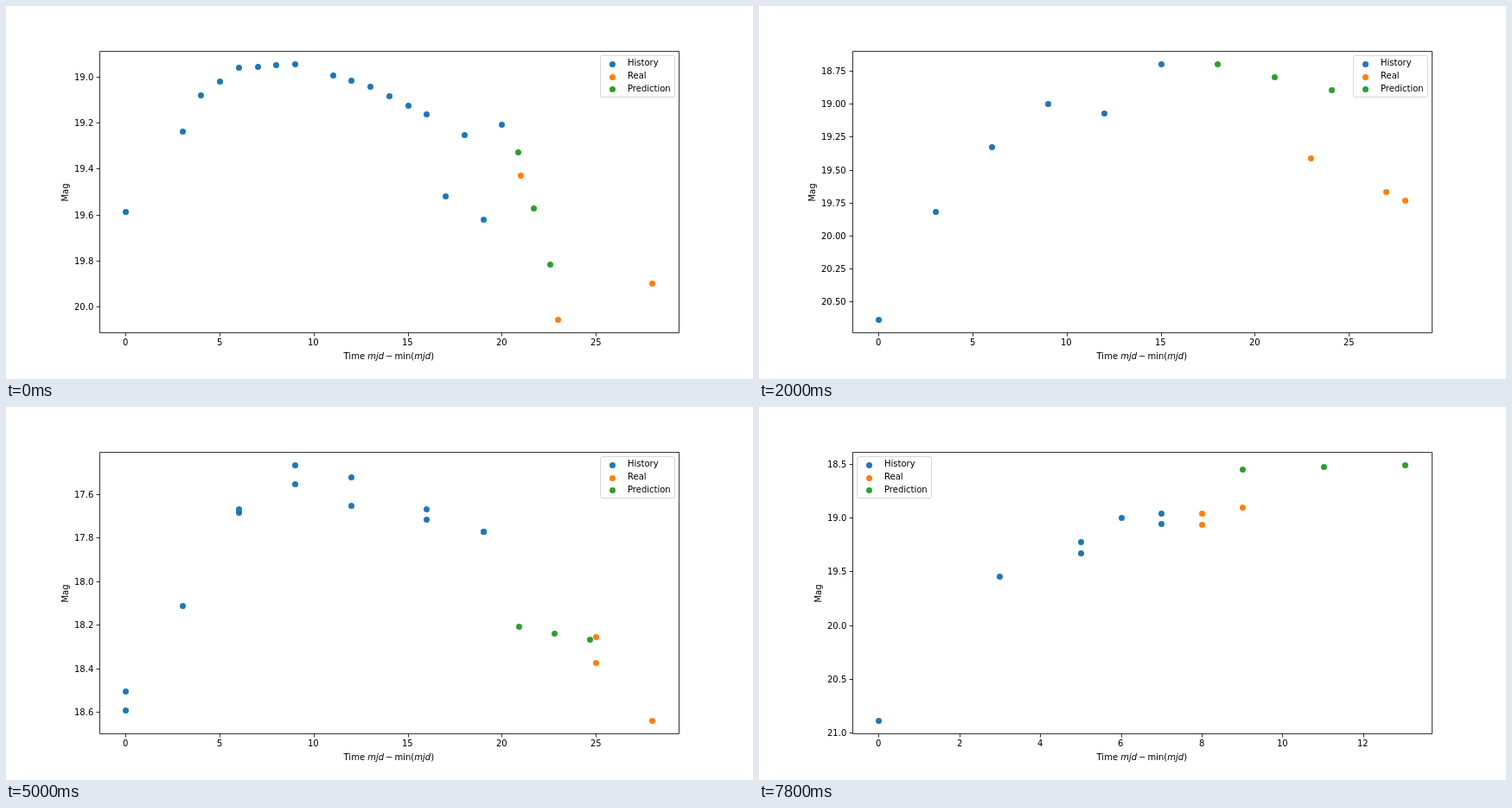
Write an HTML page that moves like this. It is 864 px wide and 432 px high and loops after 8 s.

```html
<!DOCTYPE html>
<html lang="en">
<head>
<meta charset="utf-8">
<title>Light curve prediction</title>
<style>
  html, body { margin: 0; width: 100%; height: 100%; overflow: hidden; background: #fff; }
  svg { display: block; width: 864px; height: 432px; font: 10px "DejaVu Sans", sans-serif; }
  .line { stroke: #000; stroke-width: .8; fill: none; }
</style>
</head>
<body>
<svg id="chart" viewBox="0 0 864 432"></svg>
<script>
const STEP_MS = 200;
const COLORS = ['#1f77b4', '#ff7f0e', '#2ca02c'];
const NAMES = ['History', 'Real', 'Prediction'];
const AX = { left: 108, right: 777.6, top: 51.84, bottom: 378 };
const DIGIT = 6.36, POINT = 3.18;  // glyph widths

const range = (from, to, step = 1) =>
  Array.from({ length: Math.floor((to - from) / step) + 1 }, (_, i) => from + i * step);

// trend: key points of the brightness curve; scatter: offset added to it on a night;
// split: difference between two measurements of one night;
// lead, fade, slope: how the prediction runs on from the last known point;
// grow: how many points are known in the first and last scene.
const CURVES = [
  { grow: [18, 21], lead: .52, fade: .12, slope: .245,
    nights: [0, ...range(3, 9), ...range(11, 21), 23, ...range(28, 32)],
    trend: [[0, 19.587], [3, 19.238], [4, 19.08], [6, 18.96], [9, 18.942], [13, 19.04],
      [16, 19.163], [17, 19.36], [19, 19.46], [21, 19.27], [23, 19.897], [28, 20.06], [32, 20.5]],
    scatter: t => t > 16 ? (t % 2 ? .16 : -.16) : 0 },
  { grow: [3, 5], lead: 2.3, fade: -.03, slope: .26,
    nights: [0, 6, 9, 14, 18, 22, 22, 28],
    trend: [[0, 18.04], [6, 17.707], [9, 17.756], [14, 18.012], [22, 18.648], [28, 18.893]] },
  { grow: [3, 10], lead: 2.02, fade: 0, slope: .1,
    nights: [...range(0, 15, 3), 23, 27, 28, ...range(30, 36, 2)],
    trend: [[0, 20.638], [3, 19.818], [6, 19.327], [9, 19], [12, 19.071], [15, 18.695],
      [23, 19.411], [36, 20.25]] },
  { grow: [3, 22], lead: .9, fade: .145, slope: .03,
    nights: [...range(0, 12, 3), 16, 19, ...range(25, 34, 3), 40, 43]
      .flatMap(n => n === 3 ? [n] : [n, n]),
    trend: [[0, 18.548], [6, 17.677], [9, 17.51], [19, 17.773], [34, 19.124], [40, 19.1], [43, 20.37]],
    split: t => .13 * Math.sin((t - 4.5) / 14.5 * Math.PI) ** 2 },
  { grow: [3, 7], lead: 1.68, fade: -.41, slope: -.02,
    nights: [0, 3, 5, 5, 6, 7, 7, 8, 8, 9],
    trend: [[0, 20.889], [3, 19.541], [5, 19.275], [6, 19], [8, 19.008], [9, 18.904]],
    split: () => .1 }
];

function interpolate(keys, t) {
  const i = Math.max(1, keys.findIndex(k => k[0] >= t));
  const [[t0, m0], [t1, m1]] = keys.slice(i - 1, i + 1);
  return m0 + (m1 - m0) * (t - t0) / (t1 - t0);
}

function observe({ nights, trend, scatter = () => 0, split = () => 0 }) {
  return nights.map((t, i) => {
    const side = nights[i + 1] === t ? .5 : nights[i - 1] === t ? -.5 : 0;
    return [t, interpolate(trend, t) + scatter(t) + side * split(t)];
  });
}

function predict({ lead, fade, slope }, history) {
  const [t, m] = history.at(-1);
  const gap = t - history.findLast(p => p[0] < t)[0];
  return range(0, 2).map(k => [t + (k + 1) * (lead + gap / 3), m + fade * gap + slope * k]);
}

const snap = v => Math.round(v) + .5;

// Axis with 5% margins and at most nine round intervals.
function makeAxis(values, from, to) {
  const min = Math.min(...values), max = Math.max(...values);
  const pad = (max - min) * .05, lo = min - pad, hi = max + pad;
  const raw = (hi - lo) / 9, unit = 10 ** Math.floor(Math.log10(raw));
  const step = [1, 2, 2.5, 5, 10].map(s => s * unit).find(s => s >= raw);
  let digits = 0;
  while (Math.abs(step * 10 ** digits - Math.round(step * 10 ** digits)) > 1e-6) digits++;
  const ticks = [];
  for (let k = Math.ceil(lo / step); k * step <= hi; k++) ticks.push(k * step);
  return { ticks, digits, at: v => from + (v - lo) / (hi - lo) * (to - from) };
}

const dot = (x, y, color) =>
  `<circle cx="${snap(x)}" cy="${snap(y)}" r="3.5" fill="${color}"/>`;
const text = (x, y, content, extra = '') => `<text x="${x}" y="${y}" ${extra}>${content}</text>`;
const line = d => `<path class="line" d="${d}"/>`;

// Number starting on a whole pixel; align is the share of its width left of x.
function number(x, y, value, digits, align) {
  const label = value.toFixed(digits);
  const width = label.replace('.', '').length * DIGIT + (digits ? POINT : 0);
  return text(Math.round(x - width * align), y, label);
}

// The first corner that covers no point.
function legend(spots) {
  const corners = [[687, 57], [113, 57], [113, 325], [687, 325]];
  const free = ([x, y]) =>
    !spots.some(([px, py]) => px > x && px < x + 86 && py > y && py < y + 48);
  const [x, y] = corners.find(free) || corners[0];
  return `<rect x="${x + .5}" y="${y + .5}" width="86" height="48" rx="2"
      fill="#fff" fill-opacity=".8" stroke="#ccc" stroke-opacity=".8"/>` +
    NAMES.map((name, i) => dot(x + 14, y + 9.9 + 14.7 * i, COLORS[i]) +
      text(x + 32, y + 12 + 15 * i, name)).join('');
}

function drawScene(curve, known) {
  const all = observe(curve);
  const history = all.slice(0, known);
  const groups = [history, all.slice(known, known + 3), predict(curve, history)];
  const shown = groups.flat();
  const ax = makeAxis(shown.map(p => p[0]), AX.left, AX.right);
  const ay = makeAxis(shown.map(p => p[1]), AX.top, AX.bottom);
  const place = ([t, m]) => [ax.at(t), ay.at(m)];

  const dots = groups.map((g, i) => g.map(p => dot(...place(p), COLORS[i])).join('')).join('');
  const xTicks = ax.ticks.map(v => line(`M${snap(ax.at(v))} 378.5v4`) +
    number(ax.at(v), 393, v, ax.digits, .5)).join('');
  const yTicks = ay.ticks.map(v => line(`M108.5 ${snap(ay.at(v))}h-4`) +
    number(101, Math.round(ay.at(v)) + 4, v, ay.digits, 1)).join('');
  const magX = 79 - 7 * ay.digits;
  const mjd = '<tspan font-style="oblique">mjd</tspan>';
  const middle = 'text-anchor="middle"';

  return dots + xTicks + yTicks + line('M108.5 52.5H778.5V378.5H108.5Z') +
    text(442.8, 409, `Time ${mjd}<tspan dx="2">−</tspan><tspan dx="2">min(</tspan>${mjd})`, middle) +
    text(magX, 216, 'Mag', `${middle} transform="rotate(-90 ${magX} 216)"`) +
    legend(shown.map(place));
}

const scenes = CURVES.flatMap(curve => range(...curve.grow).map(known => drawScene(curve, known)));

const chart = document.getElementById('chart');
const start = performance.now();
let current = -1;

function tick(now) {
  const index = Math.floor(Math.max(0, now - start) / STEP_MS) % scenes.length;
  if (index !== current) chart.innerHTML = scenes[current = index];
  requestAnimationFrame(tick);
}
tick(start);
</script>
</body>
</html>
```
